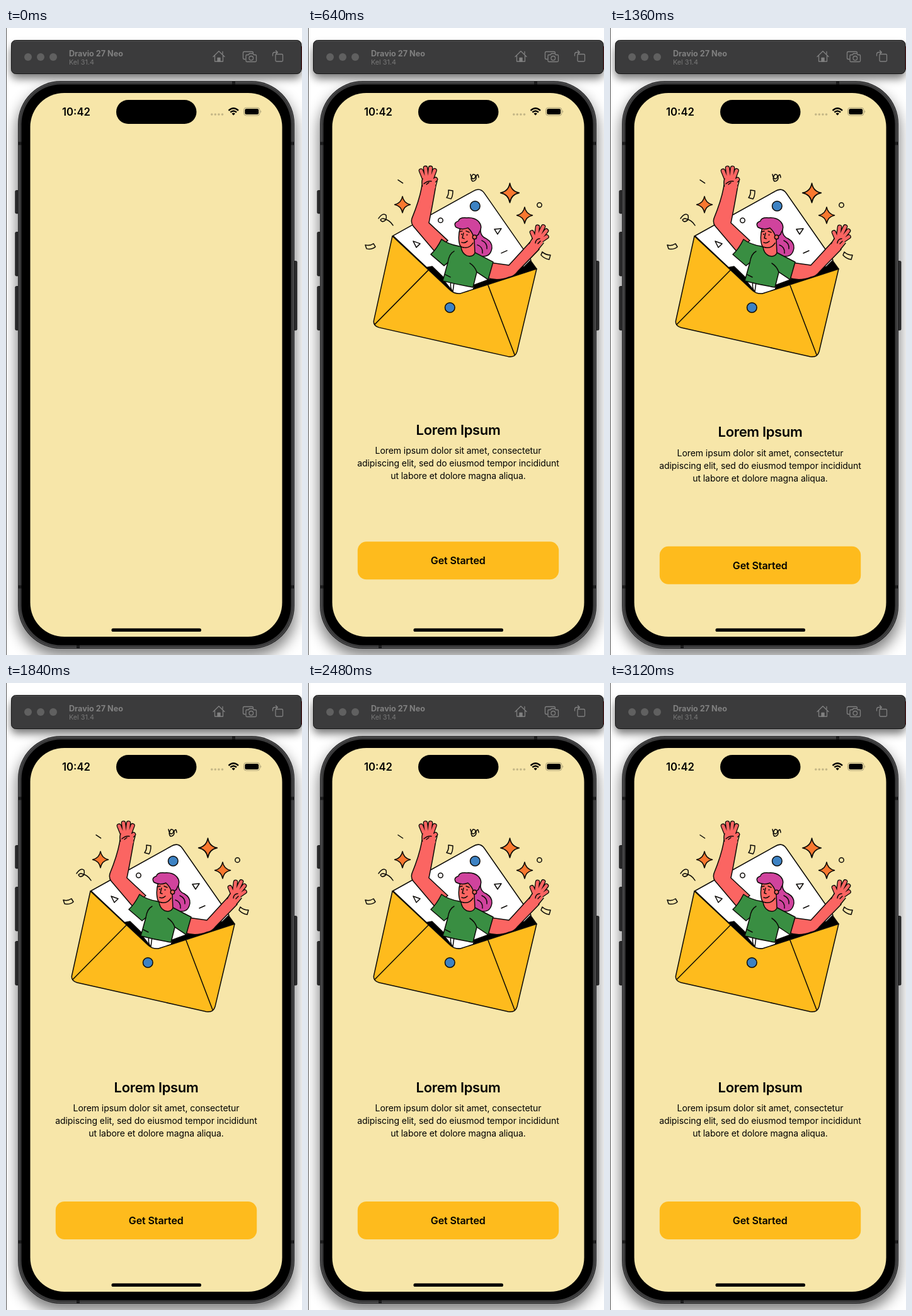
Write an HTML page that moves like this. It is 470 px wide and 994 px high and loops after 3.2 s.

```html
<!DOCTYPE html>
<html lang="en">
<head>
<meta charset="utf-8">
<title>Onboarding screen</title>
<style>
  html, body { margin: 0; width: 100%; height: 100%; overflow: hidden; background: #fff; }
  svg { display: block; width: 470px; height: 994px; }
  text { font-family: Inter, "Liberation Sans", sans-serif; }
  .mid { text-anchor: middle; }
  .semi { font-weight: 600; }
  .icon { fill: none; stroke: #808080; stroke-width: 1.3; stroke-linejoin: round; stroke-linecap: round; }
  .ink { stroke: #0b0906; stroke-width: 1.5; stroke-linejoin: round; stroke-linecap: round; }
  .line { fill: none; }
  .skin { fill: #fb6562; }
  .white { fill: #fff; }
  .gold { fill: #febb1d; }
  .green { fill: #398e42; }
  .hair { fill: #d0439d; }
  .blue { fill: #3d82c3; }
  .spark { fill: #f9782f; }
  .finger { fill: none; stroke-linecap: round; }
  .edge { stroke: #0b0906; stroke-width: 7.6; }
  .flesh { stroke: #fb6562; stroke-width: 5; }
  #pic, #copy, #cta { opacity: 0; }
</style>
</head>
<body>
<svg viewBox="0 0 470 994">
  <defs>
    <filter id="soft" x="-20%" y="-20%" width="140%" height="140%"><feGaussianBlur stdDeviation="11"/></filter>
    <filter id="near" x="-10%" y="-60%" width="120%" height="220%"><feGaussianBlur stdDeviation="7"/></filter>
    <path id="star" d="M0 -13Q2 -2 12.5 0Q2 2 0 13Q-2 2 -12.5 0Q-2 -2 0 -13Z"/>
    <path id="handL" d="M187 245L179.500 226.500M189 243L186.500 222M192 243L194.500 222M194 245L201 226M195 247L202.500 240"/>
    <path id="handR" d="M361 337L355.500 324M362 335L364.500 315.500M364 335L373.500 315M366 337L378.500 321.500M366 340L379 331"/>
  </defs>

  <rect width="470" height="994" fill="#fff"/>

  <!-- Shadows -->
  <rect x="17" y="96" width="443" height="900" rx="68" opacity=".5" filter="url(#soft)"/>
  <rect x="8" y="28" width="461" height="52" rx="9" opacity=".55" filter="url(#near)"/>
  <rect width="1" height="994" fill="#555"/>

  <!-- Window bar -->
  <rect x="8.500" y="19.500" width="460.500" height="53" rx="7" fill="#3b3b3c" stroke="#151515"/>
  <path d="M14 20.700H463" stroke="#505050" fill="none"/>
  <path d="M469.500 29V66" stroke="#4b1114"/>
  <g fill="#606060">
    <circle cx="35" cy="46" r="6"/><circle cx="55" cy="46" r="6"/><circle cx="75" cy="46" r="6"/>
  </g>
  <text x="100" y="44.500" font-size="12.600" font-weight="700" fill="#808080">Dravio 27 Neo</text>
  <text x="100" y="58" font-size="10.800" fill="#777">Kel 31.4</text>
  <g class="icon">
    <path d="M329 45.500L338 36.800L347 45.500M331.500 43.500V53H344.500V43.500M344 37.500V41"/>
    <path d="M336 53V47.500H340V53Z" fill="#808080"/>
    <path d="M380 49.500H378.500Q376.500 49.500 376.500 47.500V39.500Q376.500 37.500 378.500 37.500H390.500Q392.500 37.500 392.500 39.500"/>
    <path d="M382.500 42.500H385L386.500 40.500H392L393.500 42.500H396Q397.500 42.500 397.500 44V52Q397.500 53.500 396 53.500H382.500Q381 53.500 381 52V44Q381 42.500 382.500 42.500Z"/>
    <circle cx="389.300" cy="47.800" r="3.300"/>
    <rect x="428" y="41.500" width="11.500" height="11.500" rx="1.500"/>
    <path d="M423.500 44V42Q423.500 38.500 427 38.500H431M428.500 35.700L431.300 38.500L428.500 41.300"/>
  </g>

  <!-- Phone body -->
  <g fill="#2a2a2b" stroke="#111" stroke-width=".8">
    <rect x="14.800" y="257.500" width="7" height="36.500" rx="1.500"/>
    <rect x="14.800" y="323.500" width="7" height="69.500" rx="1.500"/>
    <rect x="14.800" y="409.500" width="7" height="69.500" rx="1.500"/>
    <rect x="455" y="369.500" width="7" height="109.500" rx="1.500"/>
  </g>
  <rect x="19" y="84" width="439" height="900" rx="68" fill="#1d1d1e"/>
  <rect x="20.500" y="85.500" width="436" height="897" rx="66.500" fill="#3a3a3b" stroke="#5b5b5c"/>
  <path d="M361.500 84V90M114.500 977V984M19 183H25M19 886H25M452 183H458M452 886H458" stroke="#1c1c1d" stroke-width="5"/>
  <rect x="24.500" y="89.500" width="428" height="889" rx="63" fill="#000"/>
  <rect x="38.500" y="103" width="400" height="862" rx="54" fill="#f7e6a9"/>

  <!-- Status bar -->
  <text class="mid semi" x="111.500" y="138.700" font-size="16.700">10:42</text>
  <rect x="175" y="114" width="127.500" height="38" rx="19"/>
  <g fill="#c3b686">
    <circle cx="326.800" cy="137" r="1.800"/><circle cx="332.300" cy="137" r="1.800"/>
    <circle cx="337.900" cy="137" r="1.800"/><circle cx="343.500" cy="137" r="1.800"/>
  </g>
  <path d="M353.500 130.800Q361.200 123.500 369 130.800M356.300 133.700Q361.200 129.200 366.100 133.700" fill="none" stroke="#000" stroke-width="2.400"/>
  <path d="M358.500 135.700Q361.200 133.400 363.900 135.700L361.200 138.500Z"/>
  <rect x="377.500" y="126.300" width="25.500" height="12.500" rx="4" fill="none" stroke="#a59b74"/>
  <rect x="379.300" y="128.100" width="21.900" height="8.900" rx="2.500"/>
  <path d="M404.300 130.500Q406.300 132.500 404.300 134.500Z" fill="#a59b74"/>

  <!-- Illustration -->
  <g id="pic">
    <path class="ink" d="M134 330L350 364L363 382L235 423Z"/>
    <path class="ink white" d="M135 329.500L262 259Q273 252 280 262L354 368L344 378L262 408L228 417Z"/>
    <path class="ink" d="M186 380L197 378L230 410L226 416Z"/>
    <circle class="ink blue" cx="265.300" cy="282.300" r="7.800"/>

    <path class="ink hair" d="M262 304Q274 310 274 323Q275 331 283 334Q293 340 292 349Q290 362 279 362Q269 364 259 355Z"/>

    <path class="ink skin" d="M181 249Q178 270 165 302Q163 309 167 314L201 354L222 337L192 309Q197 285 203 250Z"/>
    <use href="#handL" class="finger edge"/>
    <use href="#handL" class="finger flesh"/>
    <path class="skin" d="M182 254Q179 241 185 236L196 236Q205 243 202 254Z"/>
    <path class="ink line" d="M181.500 251Q180 243 182 239M203 250L205 243M184 247Q190 242 196 243M188 248L192 245"/>

    <path class="ink skin" d="M352 340L319 376L290 372L284 396Q301 402 319 395Q327 394 333 386L367 351Z"/>
    <use href="#handR" class="finger edge"/>
    <use href="#handR" class="finger flesh"/>
    <path class="skin" d="M351 344L358 332L369 331L373 340L365 352Z"/>
    <path class="ink line" d="M351 342L356 334M366 351L374 341M361 341Q362 334 368 334M365 342L369 338"/>

    <path class="ink white" d="M215 399L264 409L262 415Q240 424 232 421Z"/>
    <path class="ink line" d="M227 402Q225 411 229 417M232 403L230 418"/>
    <path class="ink green" d="M212 335Q222 343 240 346L265 356Q282 365 294 371Q290 385 286 399L268 387L262 411Q237 407 214 401L222 372L216 377L195 359Q204 351 212 335Z"/>
    <path class="ink line" d="M222 372Q224 358 232 354M268 387Q265 378 257 373M218 391L226 395"/>

    <path class="ink skin" d="M242 316Q238 328 240 340Q241 348 247 348L243 347Q244 357 252 361Q261 364 265 357L264 335L266 316Z"/>
    <path class="ink line" d="M247 348Q256 350 262 341"/>
    <path class="ink hair" d="M235 316Q230 309 239 306Q240 300 252 301Q264 300 271 307Q278 315 272 324Q271 330 263 331Q260 322 254 317Q244 321 235 316Z"/>
    <circle class="ink skin" cx="264.500" cy="331.500" r="3.200"/>
    <path class="ink line" stroke-width="1" d="M241 323L245 322M251 322L256 324M247 325L245 333L248 334M244 340Q249 342 253 338"/>
    <circle cx="244" cy="327" r="1"/><circle cx="252.500" cy="328" r="1"/>
    <path class="ink line" d="M276 337Q285 341 284 350M269 344Q278 347 277 357"/>

    <path class="ink gold" d="M134 330L225 415Q232 422 242 421L363 382L332 513Q329 523 318 521L113 475Q103 472 104.500 464Z"/>
    <path class="ink line" d="M106 470L191 384M328 518L286 408"/>
    <circle class="ink blue" cx="225.300" cy="443.300" r="7.800"/>

    <g class="ink spark">
      <use href="#star" x="150" y="280"/>
      <use href="#star" x="344" y="297"/>
      <use href="#star" transform="translate(320.500 261.500) scale(1.180)"/>
    </g>
    <g class="ink line">
      <circle cx="210.500" cy="305" r="3.700"/><circle cx="367.500" cy="280.700" r="3.700"/>
      <path d="M167 338L178 342L172 348Z M296 319L307 318L301 327Z"/>
      <path d="M143 241L150.500 246M307 357L316 353"/>
      <path d="M223 257L230 258Q230 267 227 271L220 269Q224 264 223 257Z"/>
      <path d="M91 344Q98 346 104 342L107 347Q101 352 93 350Z"/>
      <path d="M372 355Q377 360 385 360L383 367Q375 366 370 360Z"/>
      <path d="M258 232Q260 242 265 238Q268 232 262 232Q257 238 261 243Q268 243 267 235Q270 229 271 237"/>
      <path d="M112 302Q119 292 124 297Q126 306 118 307Q112 304 119 302Q130 304 135 313"/>
    </g>
  </g>

  <!-- Text and button -->
  <g id="copy" class="mid">
    <text class="semi" x="238.500" y="648.500" font-size="22" letter-spacing="-.35">Lorem Ipsum</text>
    <g font-size="14" letter-spacing="-.07">
      <text x="238.500" y="679">Lorem ipsum dolor sit amet, consectetur</text>
      <text x="238.500" y="699">adipiscing elit, sed do eiusmod tempor incididunt</text>
      <text x="238.500" y="719">ut labore et dolore magna aliqua.</text>
    </g>
  </g>
  <g id="cta">
    <rect class="gold" x="78.800" y="822" width="319.400" height="60" rx="14"/>
    <text class="mid semi" x="238.300" y="857.800" font-size="16" letter-spacing="-.1">Get Started</text>
  </g>

  <rect x="167.500" y="951.800" width="142.500" height="5.200" rx="2.600"/>
</svg>
<script>
  const LOOP = 3200, STEP = 80, RISE = 50;
  const parts = [["pic", 40], ["copy", 140], ["cta", 240]]
    .map(([id, delay]) => ({ el: document.getElementById(id), delay }));

  // Remaining distance (1 to 0) of a spring: stiffness 100, damping 10, mass 1.
  function spring(ms) {
    if (ms <= 0) return 1;
    const s = ms / 1000, w = Math.sqrt(75);
    return Math.exp(-5 * s) * (Math.cos(w * s) + 5 / w * Math.sin(w * s));
  }

  const start = performance.now();
  function draw() {
    const now = (performance.now() - start) % LOOP;
    const t = Math.floor(now / STEP) * STEP;
    for (const { el, delay } of parts) {
      const left = spring(t - delay);
      el.setAttribute("transform", `translate(0 ${(left * RISE).toFixed(2)})`);
      el.style.opacity = Math.min(1, 1 - left);
    }
    requestAnimationFrame(draw);
  }
  draw();
</script>
</body>
</html>
```
